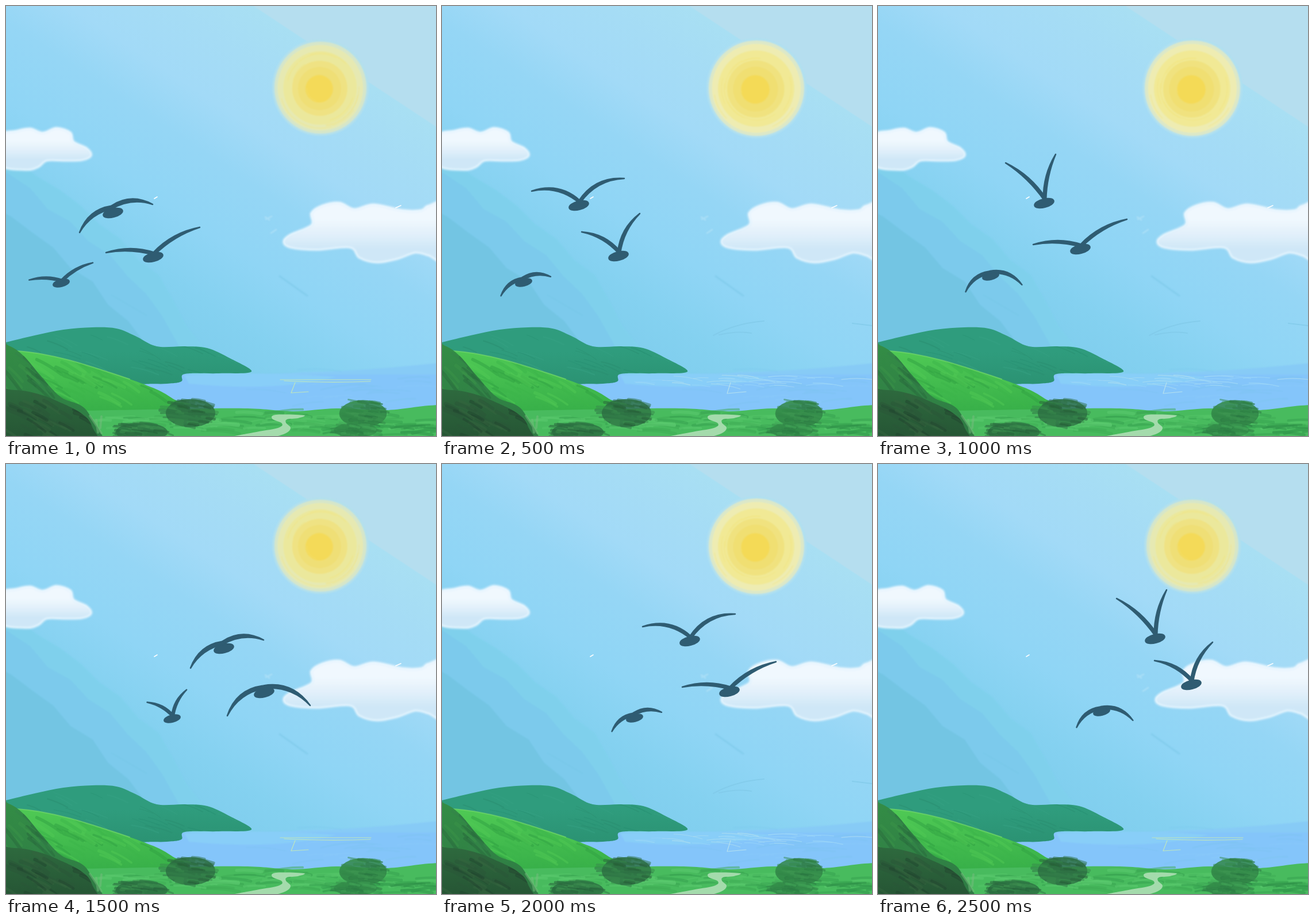
Write an HTML page that moves like this. It is 748 px wide and 748 px high and loops after 3 s.

```html
<!DOCTYPE html>
<html lang="en">
<head>
<meta charset="utf-8">
<title>Birds over the bay</title>
<style>
html, body { margin: 0; width: 100%; height: 100%; overflow: hidden; background: #93d5f5; }
svg { display: block; width: 100vw; height: 100vh; }
</style>
</head>
<body>
<svg id="stage" viewBox="0 0 748 748">
  <defs id="defs">
    <linearGradient id="sky" gradientUnits="userSpaceOnUse" x1="748" y1="0" x2="177" y2="864">
      <stop offset=".168" stop-color="#b5deef"/>
      <stop offset=".17" stop-color="#a8dff3"/>
      <stop offset=".25" stop-color="#a5dcf5"/>
      <stop offset=".34" stop-color="#a2daf7"/>
      <stop offset=".42" stop-color="#95d6f5"/>
      <stop offset=".53" stop-color="#8fd5f5"/>
      <stop offset=".63" stop-color="#84d1f0"/>
      <stop offset=".75" stop-color="#7dccec"/>
    </linearGradient>
    <linearGradient id="cloud" x2="0" y2="1">
      <stop offset=".3" stop-color="#f0f8fe"/>
      <stop offset=".55" stop-color="#e0effa"/>
      <stop offset=".75" stop-color="#cfe7f7"/>
    </linearGradient>
    <linearGradient id="far" x2="0" y2="1">
      <stop offset=".3" stop-color="#2f9c7d"/><stop offset=".8" stop-color="#2a9070"/>
    </linearGradient>
    <linearGradient id="meadow" x2="0" y2="1">
      <stop offset=".1" stop-color="#4ec854"/><stop offset=".6" stop-color="#36ae48"/>
    </linearGradient>
    <linearGradient id="slope" x2="0" y2="1">
      <stop offset="0" stop-color="#348f46"/><stop offset="1" stop-color="#2c7343"/>
    </linearGradient>
    <linearGradient id="thicket" x2="0" y2="1">
      <stop offset="0" stop-color="#2e6a3e"/><stop offset="1" stop-color="#21492f"/>
    </linearGradient>
    <filter id="soft" x="-20%" y="-20%" width="140%" height="140%"><feGaussianBlur stdDeviation="1.3"/></filter>
    <filter id="crisp" x="-20%" y="-20%" width="140%" height="140%"><feGaussianBlur stdDeviation=".7"/></filter>
  </defs>
</svg>
<script>
const STEP = 500, POSES = 6;
const LOOKS = 'abbaba';
const stage = document.getElementById('stage');
const defs = document.getElementById('defs');

function add(parent, tag, attrs = {}) {
  const el = document.createElementNS('http://www.w3.org/2000/svg', tag);
  for (const key in attrs) el.setAttribute(key, attrs[key]);
  return parent.appendChild(el);
}

const layer = (filter, parent = stage) => add(parent, 'g', { filter: `url(#${filter})` });

let seed = 17;
function random() {
  seed = (seed * 16807) % 2147483647;
  return seed / 2147483647;
}
const spread = size => (random() * 2 - 1) * size;

// Smooth curve through "x,y x,y ..." points.
function curve(text, closed) {
  const p = text.split(' ').map(pair => pair.split(',').map(Number));
  const n = p.length, at = i => closed ? p[(i + n) % n] : p[Math.max(0, Math.min(n - 1, i))];
  let d = 'M' + p[0];
  for (let i = 0; i < (closed ? n : n - 1); i++) {
    const [a, b, c, e] = [at(i - 1), at(i), at(i + 1), at(i + 2)];
    d += `C${b.map((v, k) => v + (c[k] - a[k]) / 6)} ${c.map((v, k) => v - (e[k] - b[k]) / 6)} ${c}`;
  }
  return d;
}

const shape = (parent, points, fill) => add(parent, 'path', { d: curve(points, true), fill });

function line(parent, d, stroke, width, opacity = 1) {
  add(parent, 'path', {
    d, stroke, opacity, fill: 'none', 'stroke-width': width,
    'stroke-linecap': 'round', 'stroke-linejoin': 'round'
  });
}

// Short bent marks scattered over an oval.
function brush(parent, colors, count, [cx, cy, rx, ry], angle, len, width, opacity = .5) {
  for (let i = 0; i < count; i++) {
    const r = Math.sqrt(random()), a = random() * 2 * Math.PI;
    const t = (angle + spread(8)) * Math.PI / 180, l = len * (.85 + spread(.35));
    const dx = Math.cos(t) * l, dy = Math.sin(t) * l;
    const x = cx + Math.cos(a) * r * rx - dx / 2, y = cy + Math.sin(a) * r * ry - dy / 2;
    line(parent, `M${x} ${y}q${dx / 2} ${dy / 2 - l * .07} ${dx} ${dy}`,
      colors[i % colors.length], width * (.85 + spread(.35)), opacity);
  }
}

// A hill with brush marks kept inside its outline.
function hill(parent, name, points, colors, count, oval, angle, len, width) {
  shape(add(defs, 'clipPath', { id: name + 'Clip' }), points);
  shape(parent, points, `url(#${name})`);
  brush(add(parent, 'g', { 'clip-path': `url(#${name}Clip)` }), colors, count, oval, angle, len, width);
}

function tree(parent, x, y, rx, ry, base, dark, light) {
  add(parent, 'ellipse', { cx: x, cy: y, rx: rx * .9, ry: ry * .9, fill: base, opacity: .85 });
  brush(parent, [base, dark, base, light], 50, [x, y, rx * .85, ry * .9], 8, rx * .5, 5, .5);
}

// Slanted band of sky whose upper edge wobbles and bends away downhill.
function band(parent, depth, fill) {
  let d = 'M-60 800';
  for (let u = -60; u < 900; u += 45) {
    const s = depth + spread(7) + 60 * (u / 540) ** 4;
    d += `L${u * .834 - s * .551} ${u * .551 + s * .834}`;
  }
  add(parent, 'path', { d: d + 'Z', fill });
}

function sun(parent, x, y, r, colors) {
  const g = layer('soft', parent);
  [1.05, 1, .93, .8, .6, .47, .3].forEach((k, i) =>
    add(g, 'circle', { cx: x - (1 - k) * 3, cy: y + (1 - k) * 3, r: r * k, fill: colors[i] }));
  for (let i = 0; i < 14; i++) {
    const q = r * (.3 + random() * .6), a = random() * 6.28, b = a + .6 + random();
    line(g, `M${x + q * Math.cos(a)} ${y + q * Math.sin(a)}A${q} ${q} 0 0 1 ${x + q * Math.cos(b)} ${y + q * Math.sin(b)}`,
      '#f2e077', 1.5, .4);
  }
}

function cloud(parent, points) {
  const g = layer('soft', parent), d = curve(points, true);
  add(g, 'path', { d, fill: 'url(#cloud)' });
  line(g, d, '#d8eefb', 7, .35);
  line(g, d, '#f5fbff', 3, .55);
}

function clouds(parent, shift) {
  const g = add(parent, 'g', { transform: `translate(${shift})` });
  cloud(g, '-10,226 18,217 42,213 64,220 88,212 112,220 118,236 140,247 148,260 132,268 100,269 71,269 56,280 34,285 -10,276');
  cloud(g, '483,410 494,398 531,381 531,360 550,347 580,342 606,353 640,345 690,355 722,355 735,347 770,345 770,445 735,434 712,429 680,440 645,446 615,438 598,420 540,424 495,420');
}

add(stage, 'rect', { width: 748, height: 748, fill: 'url(#sky)' });
const air = layer('soft');
band(air, 212, '#7fd0ec');
band(air, 246, '#7bcaec');
band(air, 306, '#73c5e3');
line(air, 'M476 470L524 504M184 503L244 538', '#7bc7e8', 3, .5);
line(air, 'M452 371l10-5M451 367l7 5M461 395l9-6', '#b4e2f7', 3, .6);

const lookA = add(stage, 'g'), lookB = add(stage, 'g');
sun(lookA, 547, 142, 80, ['#b3e0ec', '#d6e6c9', '#e6e9b2', '#ebe89c', '#efe283', '#efdf76', '#f4da58']);
sun(lookB, 547, 143, 83, ['#b0e0f0', '#dce8c8', '#eeecb2', '#f1e995', '#f0e27f', '#f0df72', '#f4da56']);
clouds(lookA, 0);
clouds(lookB, 3);
line(lookB, 'M472 573Q510 552 560 548M482 572Q510 565 538 569M714 552L748 556', '#80c9e9', 2, .7);
line(stage, 'M678 351l9-4M258 335l5-3', '#fff', 1.6);

const sea = layer('soft');
add(sea, 'path', { d: 'M425 640Q600 638 760 620V665H425Z', fill: '#87cbf6' });
add(sea, 'path', { d: 'M240 641H760V710H240Z', fill: '#84c5fa' });
add(sea, 'path', { d: 'M310 642Q450 636 575 645Q470 672 318 657Z', fill: '#88cef8' });
brush(sea, ['#79c2ec', '#8acbf8'], 24, [600, 665, 150, 34], -2, 70, 1.5, .6);
const sailsA = add(stage, 'g'), sailsB = add(stage, 'g');
line(sailsA, 'M477 650H635M484 652Q560 656 634 653M503 655L496 673L526 671', '#bfe6bd', 1.2);
brush(sailsB, ['#a5dcf6', '#96d3fa', '#b4e1ef'], 34, [535, 653, 205, 9], 2, 48, 1.4, .65);
line(sailsB, 'M502 655L496 674L529 671', '#b6e1ee', 1.2);

const land = layer('crisp');
hill(land, 'far',
  '-30,592 0,585 50,573 100,563 150,559 192,561 225,574 262,592 310,592 350,595 390,613 427,636 370,639 311,640 305,653 280,657 200,662 -30,700',
  ['#2a8e70', '#37a184', '#279073'], 40, [205, 612, 190, 42], 22, 42, 2);
const ridge = '20,600 60,605 110,616 160,631 215,649';
hill(land, 'meadow', '-30,598 ' + ridge + ' 262,667 290,683 318,704 318,780 -30,780',
  ['#50ca55', '#3cb64b', '#30a243'], 60, [155, 660, 130, 42], 28, 46, 5);
line(land, curve(ridge), '#7add6b', 2, .6);
shape(land, '-30,706 130,704 300,701 420,700 500,705 575,700 660,703 780,700 780,790 -30,790', '#48bb5e');
brush(land, ['#5dcb70', '#3eac55', '#35a04f', '#55c568'], 80, [450, 724, 300, 18], 0, 60, 5);
brush(land, ['#2f9149', '#37a150'], 26, [660, 738, 100, 9], -2, 50, 5);
shape(land, '385,752 430,742 473,734 480,726 463,718 470,711 518,712 508,717 489,719 487,725 495,734 485,744 450,752', '#a4dbac');
hill(land, 'slope', '-30,582 5,591 30,608 60,643 95,680 142,706 165,790 -30,790',
  ['#3b9449', '#296a3d', '#34834a'], 50, [55, 670, 75, 68], 46, 43, 6);
hill(land, 'thicket', '-30,676 15,668 60,676 95,690 130,708 150,732 160,790 -30,790',
  ['#2b5638', '#35643f', '#20452e'], 45, [65, 720, 82, 43], 28, 35, 7);
line(land, 'M146 713L166 743M157 720L160 742M166 714L164 734', '#76bc7e', 4, .5);
tree(land, 321, 708, 48, 27, '#2d7043', '#265d38', '#388a4c');
tree(land, 236, 741, 50, 18, '#2d7443', '#245b38', '#3d8f50');
tree(land, 621, 709, 46, 26, '#328748', '#297641', '#3c9350');
tree(land, 608, 738, 42, 14, '#338c49', '#2b7c43', '#42a558');

// Wing tips on both sides of the body, and how strongly the wings bow.
const WINGS = {
  high: [-67, -70, 20, -85, .12],
  vee: [-64, -42, 37, -74, .19],
  arc: [-82, -25, 79, -47, .27],
  glide: [-82, -8, 81, -52, .14],
  tilt: [-58, 34, 69, -15, .26],
  arch: [-64, 40, 80, 22, .28]
};

// Each bird repeats a three-beat path, moved on by one drift per round.
const DRIFT = [193, -39];
const BIRDS = [
  { size: 1, path: [[186, 360], [238, 347], [289, 343]], beats: 'tilt arc high tilt arc high' },
  { size: 1, path: [[256, 437], [307, 435], [352, 423]], beats: 'glide vee glide arch glide vee' },
  { size: .68, path: [[96, 482], [142, 481], [196, 470]], beats: 'glide tilt arch vee tilt arch' }
];

function wing(parent, tx, ty, sx, sy, bow, thick) {
  const dx = sx - tx, dy = sy - ty, side = Math.sign(dx) || 1;
  const len = Math.hypot(dx, dy), nx = dy / len * side, ny = -dx / len * side;
  const edge = k => `${(tx + sx) / 2 + nx * (bow * len + k)} ${(ty + sy) / 2 + ny * (bow * len + k)}`;
  const root = k => `${sx + nx * k} ${sy + ny * k}`;
  add(parent, 'path', {
    d: `M${tx} ${ty}Q${edge(thick)} ${root(thick * .7)}L${root(-thick * .7)}Q${edge(-thick)} ${tx} ${ty}Z`
  });
}

function bird(parent, { size, path, beats }, pose) {
  const round = Math.floor(pose / path.length);
  const [x, y] = path[pose % path.length].map((v, k) => v + DRIFT[k] * round);
  const [lx, ly, rx, ry, bow] = WINGS[beats.split(' ')[pose]].map((v, i) => i < 4 ? v * size : v);
  const down = ly > 0, g = add(parent, 'g', { transform: `translate(${x} ${y})` });
  const lift = (down ? -10 : -6) * size, thick = (down ? 4 : 3.2) * Math.sqrt(size);
  wing(g, lx, ly, 2 - 3 * down, lift, bow, thick);
  wing(g, rx, ry, 1 - 3 * down, lift, bow, thick);
  add(g, 'ellipse', { rx: 17 * Math.sqrt(size), ry: 7 * Math.sqrt(size), transform: 'rotate(-14)' });
}

const flock = layer('crisp');
const poses = Array.from({ length: POSES }, (_, i) => {
  const g = add(flock, 'g', { fill: '#2f5c72', stroke: '#2f5c72', 'stroke-width': 2.5, 'stroke-linejoin': 'round' });
  BIRDS.forEach(b => bird(g, b, i));
  return g;
});

const show = (el, on) => { el.style.display = on ? '' : 'none'; };
let current = -1;

function draw(ms) {
  const pose = Math.floor(ms / STEP) % POSES;
  if (pose === current) return;
  current = pose;
  poses.forEach((el, i) => show(el, i === pose));
  [lookA, sailsA].forEach(el => show(el, LOOKS[pose] === 'a'));
  [lookB, sailsB].forEach(el => show(el, LOOKS[pose] === 'b'));
}

const start = performance.now();
function tick() {
  draw(performance.now() - start);
  requestAnimationFrame(tick);
}
draw(0);
requestAnimationFrame(tick);
</script>
</body>
</html>
```
